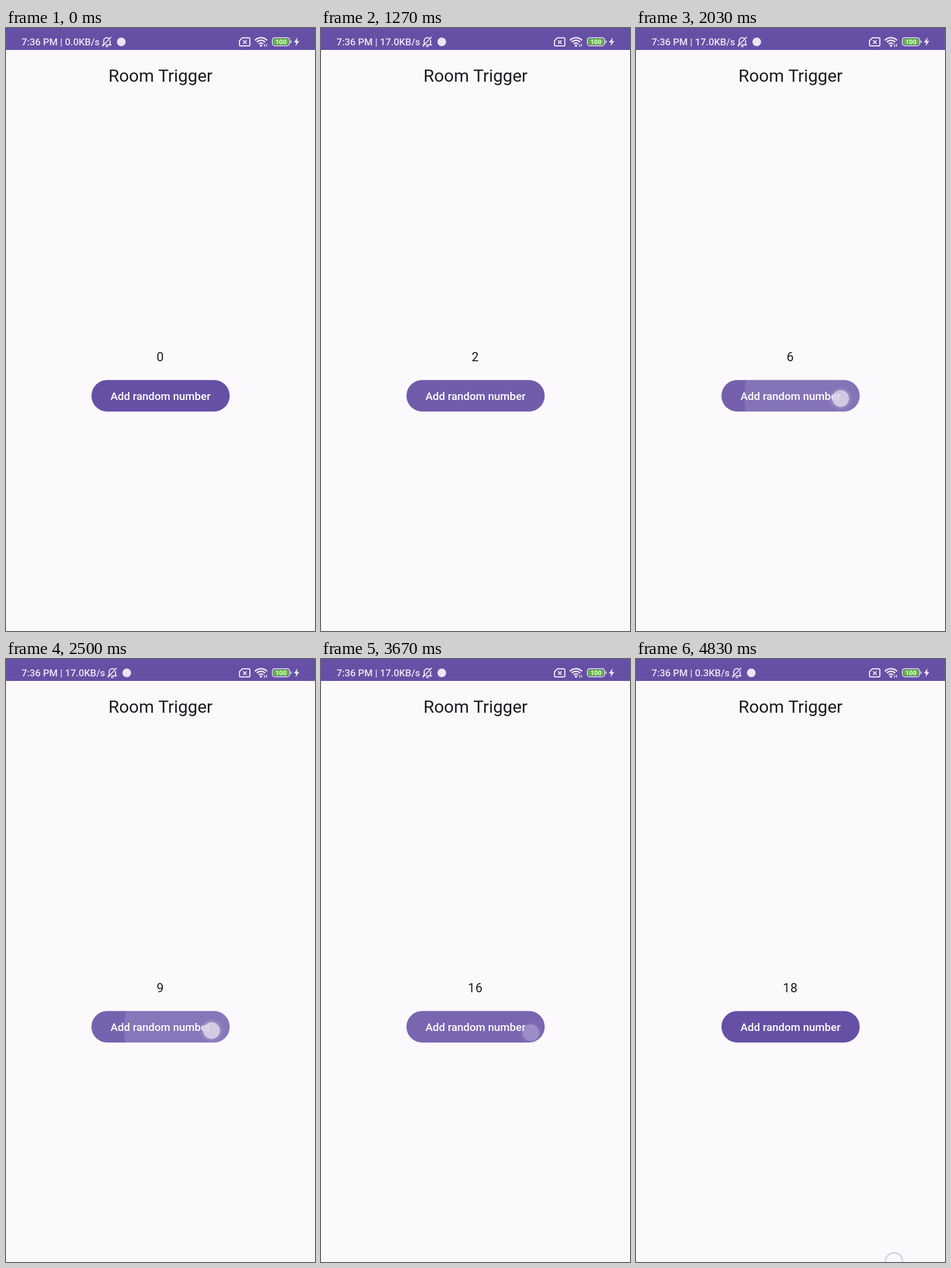
Recreate the animation shown at these times as an HTML page with a canvas. Size 536x1044 px, loop 4910 ms.

```html
<!DOCTYPE html>
<html lang="en">
<head>
<meta charset="utf-8">
<title>Room Trigger</title>
<style>
  html, body { margin: 0; width: 100%; height: 100%; overflow: hidden; background: #fcf9fd; }
  canvas { display: block; width: 536px; height: 1044px; }
</style>
</head>
<body>
<canvas id="stage" width="536" height="1044"></canvas>
<script>
const ctx = document.getElementById('stage').getContext('2d');
const LOOP = 4910, STEP = 100 / 3;
const PURPLE = '#6650a5', PAPER = '#fcf9fd', INK = '#1c1b1f', ICON = '#ebe6f5';
const FONT = 'Roboto, sans-serif';
const BTN = { x: 148.2, y: 609.5, w: 239.8, h: 54.5 };

// Press times; each release raises the counter once.
const presses = [470, 980, 1290, 1450, 1610, 1770, 1935, 2095, 2255, 2415,
  2575, 2730, 2886, 3090, 3290, 3495, 3695, 3895];
const HOLD = 95, DOT_FADE = 120, COUNT_DELAY = 120;
const ENTER = 225, EXIT = 150, RIPPLE_ALPHA = 0.12;
// Finger path: tap index, x, y
const path = [[0, 327, 634], [6, 355, 641.5], [12, 358, 645], [15, 364, 647], [17, 365, 647]];

const clamp = v => Math.max(0, Math.min(1, v));
const lerp = (a, b, p) => a + (b - a) * p;

function ease(t) { // cubic-bezier(.4, 0, .2, 1)
  let lo = 0, hi = 1, u = t;
  for (let i = 0; i < 16; i++) {
    u = (lo + hi) / 2;
    const x = 1.2 * u * (1 - u) ** 2 + 0.6 * u * u * (1 - u) + u ** 3;
    if (x < t) lo = u; else hi = u;
  }
  return 3 * u * u * (1 - u) + u ** 3;
}

function fingerAt(i) {
  const k = Math.max(1, path.findIndex(p => p[0] >= i));
  const a = path[k - 1], b = path[k], p = (i - a[0]) / (b[0] - a[0]);
  return [lerp(a[1], b[1], p), lerp(a[2], b[2], p)];
}

function text(str, x, y, size, { weight = 400, color = INK, align = 'center', gap = 0 } = {}) {
  ctx.font = `${weight} ${size}px ${FONT}`;
  ctx.letterSpacing = gap + 'px';
  ctx.textAlign = align;
  ctx.fillStyle = color;
  ctx.fillText(str, x, y);
  ctx.letterSpacing = '0px';
}

function disc(x, y, r, fill) {
  ctx.beginPath();
  ctx.arc(x, y, r, 0, 7);
  ctx.fillStyle = fill;
  ctx.fill();
}

function rounded(x, y, w, h, r) {
  ctx.beginPath();
  ctx.roundRect(x, y, w, h, r);
}

function line(d, width, color = ICON) {
  ctx.lineWidth = width;
  ctx.strokeStyle = color;
  ctx.stroke(new Path2D(d));
}

function mutedBell(x, y) {
  ctx.save();
  ctx.translate(x, y);
  line('M-8 5.5H8 M-5.5 5V-1.5C-5.5-9 5.5-9 5.5-1.5V5 M-2.2 8.3H2.2', 1.9);
  line('M-6.2 8L9.2-8.6', 2, PURPLE);
  line('M-8 8L7.5-8.5', 1.8);
  ctx.restore();
}

function simIcon() {
  line('M410 17H421Q423 17 423 19V29Q423 31 421 31H407Q405 31 405 29V22Z', 2);
  line('M411.3 21.3L417.3 27.3M417.3 21.3L411.3 27.3', 1.9);
}

function wifiIcon() {
  ctx.strokeStyle = ICON;
  ctx.lineWidth = 2.5;
  for (const r of [5.3, 9.9, 14.4]) {
    ctx.beginPath();
    ctx.arc(442.3, 31.2, r, -Math.PI * 0.76, -Math.PI * 0.24);
    ctx.stroke();
  }
  disc(442.3, 30.5, 2.1, ICON);
  line('M448.5 28V32.5M451.8 27.5V32', 1.5);
}

function battery() {
  rounded(462.2, 16.7, 29.6, 14, 4);
  ctx.fillStyle = PURPLE;
  ctx.fill();
  ctx.lineWidth = 1.6;
  ctx.strokeStyle = ICON;
  ctx.stroke();
  rounded(464, 18.5, 26, 10.4, 2.4);
  ctx.fillStyle = '#5dbb38';
  ctx.fill();
  text('100', 477, 27.7, 11, { weight: 700, color: '#eef6ea' });
  ctx.fillStyle = ICON;
  ctx.fillRect(493.6, 21.5, 1.6, 4.6);
  ctx.fill(new Path2D('M505.8 16.2L499.4 25H503.3L502.2 31.6L508.8 22.6H504.8Z'));
}

function statusBar(t) {
  ctx.fillStyle = PURPLE;
  ctx.fillRect(0, 0, 536, 38);
  const speed = t < 800 ? '0.0' : t < 4600 ? '17.0' : '0.3';
  const shift = speed.length > 3 ? 9.5 : 0;
  text(`7:36 PM | ${speed}KB/s`, 27, 30, 16.8, { weight: 500, color: ICON, align: 'left' });
  mutedBell(175 + shift, 23.8);
  disc(200 + shift, 24, 7.5, ICON);
  simIcon();
  wifiIcon();
  battery();
}

function ripple(i, t) {
  const age = t - presses[i];
  if (age < 0 || age > ENTER + EXIT) return;
  const [x, y] = fingerAt(i), p = ease(clamp(age / ENTER));
  const cx = BTN.x + BTN.w / 2, cy = BTN.y + BTN.h / 2;
  const r = lerp(BTN.w * 0.3, Math.hypot(BTN.w, BTN.h) / 2 + 2, p);
  const alpha = RIPPLE_ALPHA * clamp(age / 75) * clamp(1 - (age - ENTER) / EXIT);
  disc(lerp(x, cx, p), lerp(y, cy, p), r, `rgba(255,255,255,${alpha})`);
}

function button(t) {
  ctx.save();
  rounded(BTN.x, BTN.y, BTN.w, BTN.h, BTN.h / 2);
  ctx.fillStyle = PURPLE;
  ctx.fill();
  ctx.clip();
  presses.forEach((_, i) => ripple(i, t));
  ctx.restore();
  text('Add random number', 268, 644.3, 18.95, { weight: 500, color: '#fff' });
}

function touchDot(x, y, alpha) {
  if (alpha <= 0) return;
  ctx.save();
  ctx.globalAlpha = alpha;
  const halo = ctx.createRadialGradient(x, y, 13, x, y, 21);
  halo.addColorStop(0, 'rgba(186,180,216,.45)');
  halo.addColorStop(1, 'rgba(186,180,216,0)');
  disc(x, y, 21, halo);
  disc(x, y, 14.5, 'rgba(230,225,238,.72)');
  ctx.restore();
}

function edgeTouch(t) {
  if (t < 4795) return;
  disc(447.5, 1043, 15, PAPER);
  ctx.lineWidth = 2.4;
  ctx.strokeStyle = '#d0d0e6';
  ctx.stroke();
}

function draw(t) {
  ctx.fillStyle = PAPER;
  ctx.fillRect(0, 0, 536, 1044);
  statusBar(t);
  text('Room Trigger', 268, 93.4, 30);
  const count = presses.filter(p => t >= p + COUNT_DELAY).length;
  text(String(count), 267.8, 576.7, 21.8, { gap: 0.68 });
  button(t);
  presses.forEach((p, i) => {
    const age = t - p;
    if (age >= 0) touchDot(...fingerAt(i), clamp(1 - (age - HOLD) / DOT_FADE));
  });
  edgeTouch(t);
}

const start = performance.now();
function tick() {
  const t = (performance.now() - start) % LOOP;
  draw(Math.floor((t + 4) / STEP) * STEP);
  requestAnimationFrame(tick);
}
tick();
</script>
</body>
</html>
```
